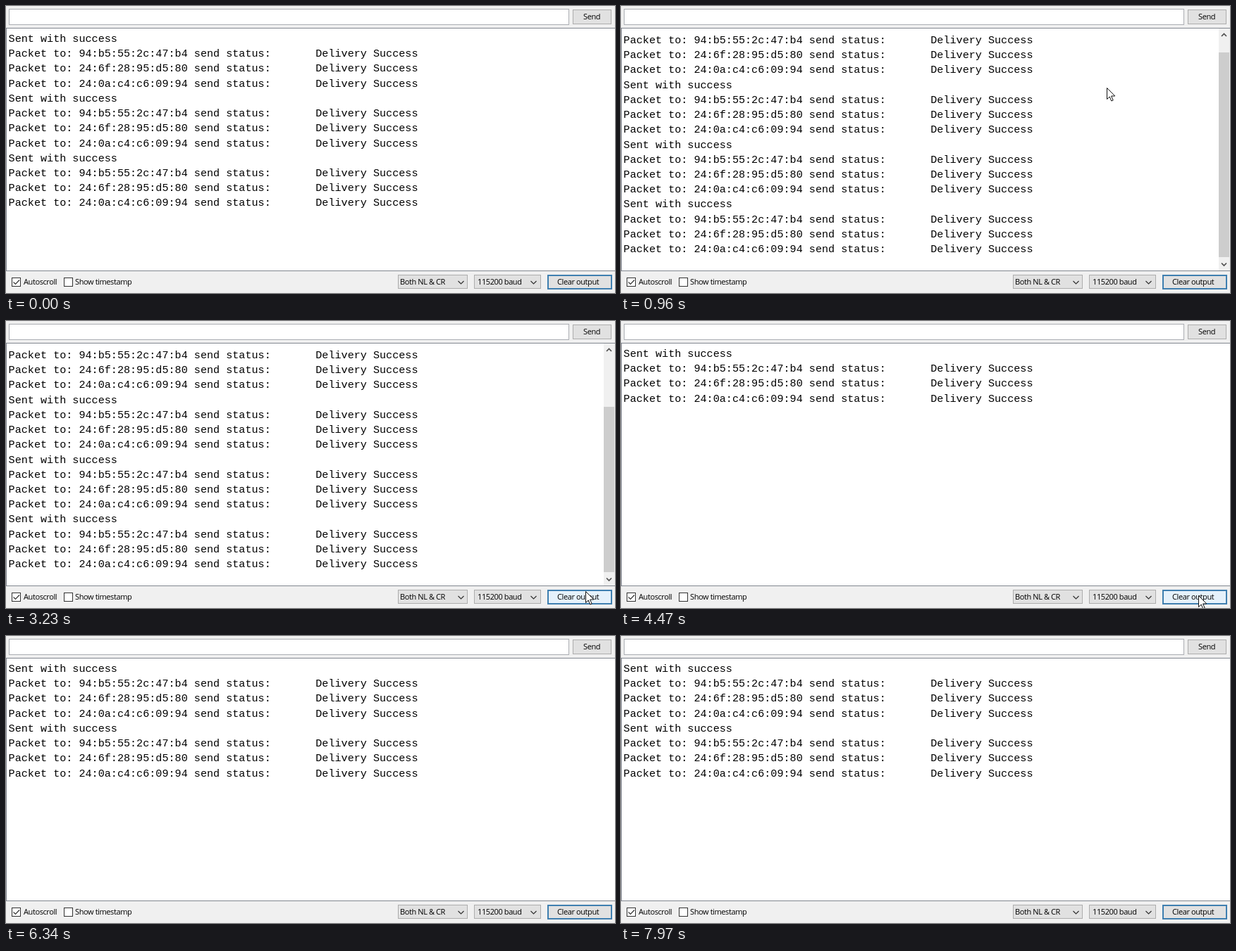
Recreate the animation shown at these times as an HTML page. Size 864 by 408 pixels, loop 8 s.

```html
<!DOCTYPE html>
<html lang="en">
<head>
<meta charset="utf-8">
<title>Serial monitor</title>
<style>
  html, body { margin: 0; width: 100%; height: 100%; overflow: hidden; background: #f0f0f0; }
  svg { display: block; }
  text { font: 11px "Open Sans", sans-serif; letter-spacing: -.4px; fill: #000; }
  #log text { font: 15.13px "Liberation Mono", monospace; letter-spacing: 0; white-space: pre; }
  .field { fill: #fff; stroke: #abadb3; }
  .button { fill: #e1e1e1; stroke: #adadad; }
  .check { fill: #fff; stroke: #333; }
  .mark { fill: none; stroke: #333; stroke-width: 1.2; }
  .arrow { fill: none; stroke: #505050; stroke-width: 1.7; }
</style>
</head>
<body>
<svg width="864" height="408" viewBox="0 0 864 408">
  <rect width="864" height="408" fill="#f0f0f0"/>
  <rect class="field" x="4.5" y="4.5" width="794" height="22"/>
  <rect class="button" x="804.5" y="5.5" width="54" height="20"/>
  <text x="819" y="19">Send</text>

  <rect x=".5" y="31.5" width="870" height="345" fill="#fff" stroke="#828790"/>
  <g id="log"></g>
  <g id="scrollbar">
    <rect x="848" y="32" width="16" height="344" fill="#f0f0f0"/>
    <rect id="thumb" x="848" width="15" fill="#cdcdcd"/>
    <path class="arrow" d="M852 43l3.5-3.5 3.5 3.5M852 365.5l3.5 3.5 3.5-3.5"/>
  </g>

  <rect class="check" x="8.5" y="386.5" width="12" height="12"/>
  <path class="mark" d="M10.5 392.5l3 3 5.5-6"/>
  <text x="25" y="396">Autoscroll</text>
  <rect class="check" x="82.5" y="386.5" width="12" height="12"/>
  <text x="98" y="396">Show timestamp</text>
  <rect class="button" x="556.5" y="382.5" width="98" height="19"/>
  <text x="559" y="396">Both NL &amp; CR</text>
  <path class="mark" d="M641.5 391l4 4 4-4"/>
  <rect class="button" x="664.5" y="382.5" width="94" height="19"/>
  <text x="669" y="396">115200 baud</text>
  <path class="mark" d="M744.5 391l4 4 4-4"/>
  <rect id="clear" x="769" y="383" width="90" height="19" stroke="#3f7fb0" stroke-width="2"/>
  <text x="782" y="396">Clear output</text>

  <path id="cursor" d="M.5 .5V16.5L4.2 13l2.600 6 2.400-1L6.600 12H11.800Z" fill="#fff" stroke="#111"/>
</svg>
<script>
  const LOOP = 8000, FIRST_SEND = 170, SEND_PERIOD = 2000, CLEARED = 3700;
  const ROW = 21.22, VISIBLE_ROWS = 15;
  const peers = ['94:b5:55:2c:47:b4', '24:6f:28:95:d5:80', '24:0a:c4:c6:09:94'];
  const batch = ['Sent with success', ...peers.map(mac =>
    `Packet to: ${mac} send status:`.padEnd(48) + 'Delivery Success')];
  // Pointer path: time, x, y
  const path = [[560, 634, 0], [960, 689, 116], [2000, 795, 163], [2850, 824, 382],
                [3230, 822, 384], [4470, 819, 390], [4750, 816, 408]];
  const $ = id => document.getElementById(id);
  let shownBatches = -1;

  function batchesAt(t) {
    const sent = Math.max(0, Math.floor((t - FIRST_SEND) / SEND_PERIOD) + 1);
    return t < CLEARED ? 3 + sent : sent - 2;
  }

  function showLog(count) {
    if (count === shownBatches) return;
    shownBatches = count;
    const scrolled = count > 3;
    const lines = Array(count).fill(batch).flat().slice(-VISIBLE_ROWS);
    const top = scrolled ? 53 : 51;
    $('log').innerHTML = lines.map((line, i) =>
      `<text x="3.6" y="${top + i * ROW}">${line}</text>`).join('');
    $('scrollbar').style.display = scrolled ? '' : 'none';
    const thumbTop = count > 4 ? 122 : 66;
    $('thumb').setAttribute('y', thumbTop);
    $('thumb').setAttribute('height', 357 - thumbTop);
  }

  function pointerAt(t) {
    const i = path.findIndex(p => p[0] > t);
    if (i < 1) return null;
    const [t0, x0, y0] = path[i - 1], [t1, x1, y1] = path[i];
    const k = (t - t0) / (t1 - t0);
    return [x0 + (x1 - x0) * k, y0 + (y1 - y0) * k].map(Math.round);
  }

  function draw(now) {
    const t = now % LOOP;
    showLog(batchesAt(t));
    const pos = pointerAt(t);
    $('cursor').style.display = pos ? '' : 'none';
    if (pos) $('cursor').setAttribute('transform', `translate(${pos})`);
    const hover = pos && pos[0] > 768 && pos[1] > 382 && pos[1] < 403;
    $('clear').setAttribute('fill', hover ? '#e5f1fb' : '#e1e1e1');
  }

  const start = performance.now();
  function tick() {
    draw(performance.now() - start);
    requestAnimationFrame(tick);
  }
  tick();
</script>
</body>
</html>
```
